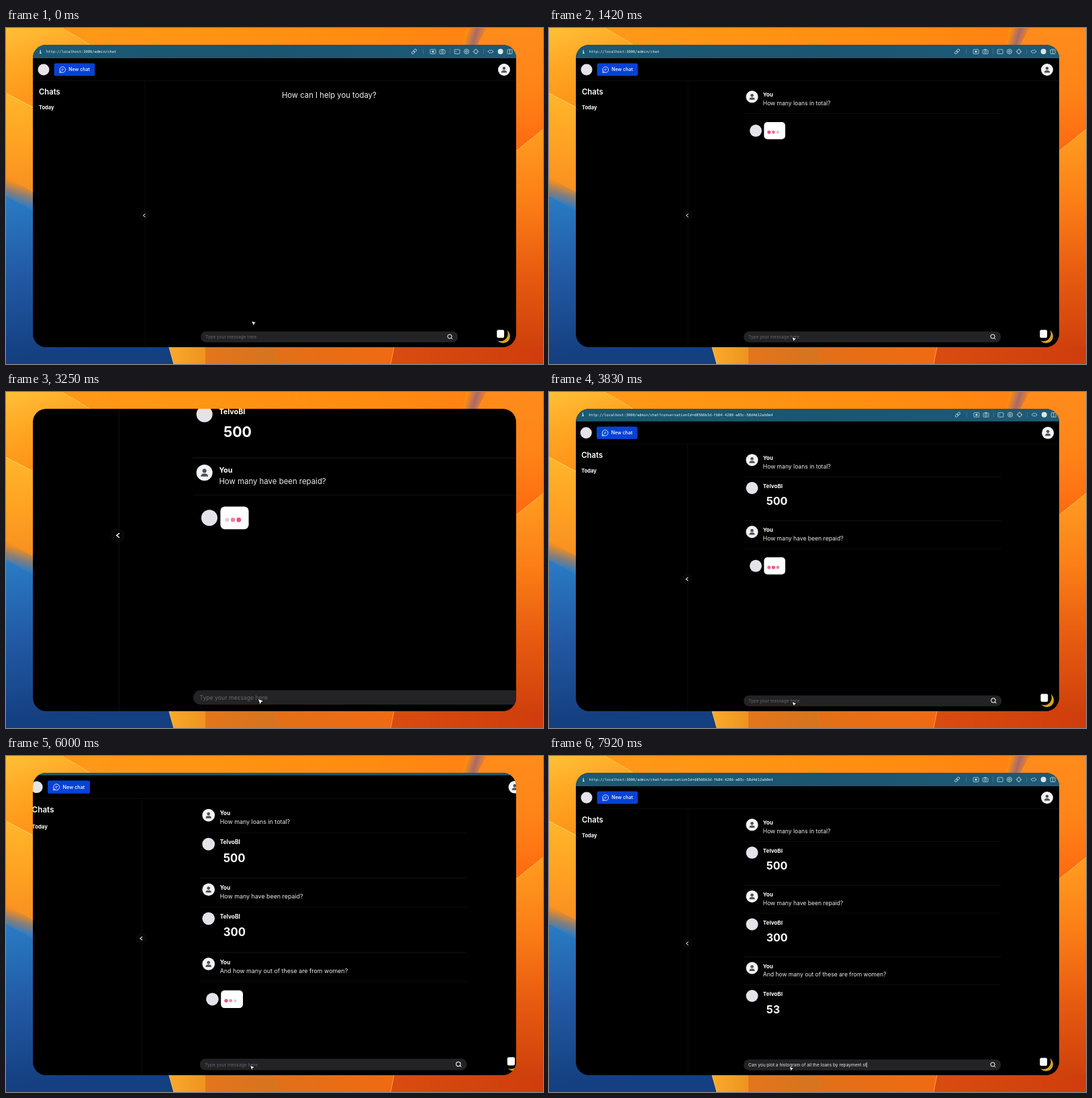
Write an HTML page with a canvas that moves like this. It is 800 by 500 pixels and loops after 8 s.

```html
<!DOCTYPE html>
<html lang="en">
<head>
<meta charset="utf-8">
<title>Chat demo</title>
<style>
  html, body { margin: 0; width: 100%; height: 100%; overflow: hidden; background: #000; }
  canvas { display: block; width: 800px; height: 500px; }
</style>
</head>
<body>
<canvas id="stage"></canvas>
<script>
const LOOP = 8000;
const BOT = 'TelvoBI';
const ROW = 106.6;
const ADDRESS = 'http://localhost:3000/admin/chat';
const CONVERSATION = '?conversationId=d8566b3d-fb84-4280-a85c-58d4d12ab0e4';
const ROUNDS = [
  { question: 'How many loans in total?', type: 450, send: 1080, reply: 1830, answer: '500' },
  { question: 'How many have been repaid?', type: 2420, send: 3100, reply: 4250, answer: '300' },
  { question: 'And how many out of these are from women?', type: 4920, send: 5560, reply: 6580, answer: '53' },
  { question: 'Can you plot a histogram of all the loans by repayment st', type: 6820, send: 7960, reply: 9000 }
];
const ZOOMS = [[2175, 3030], [4561, 5500]];
const FOCUS = { x: 323, y: 475 };
const ZOOM_GAIN = 0.95;

const canvas = document.getElementById('stage');
const ratio = window.devicePixelRatio || 1;
canvas.width = 800 * ratio;
canvas.height = 500 * ratio;
const ctx = canvas.getContext('2d');

const clamp = v => Math.max(0, Math.min(1, v));
const smooth = v => { v = clamp(v); return v * v * (3 - 2 * v); };
const lerp = (a, b, k) => a + (b - a) * k;

// Critically damped spring from 0 to 1
function spring(ms) {
  const x = Math.max(0, ms) / 100;
  return 1 - (1 + x) * Math.exp(-x);
}

function gradient(x0, y0, x1, y1, ...colors) {
  const g = ctx.createLinearGradient(x0, y0, x1, y1);
  colors.forEach((c, i) => g.addColorStop(i / (colors.length - 1), c));
  return g;
}

function poly(points, fill) {
  ctx.beginPath();
  points.forEach(([x, y]) => ctx.lineTo(x, y));
  ctx.closePath();
  ctx.fillStyle = fill;
  ctx.fill();
}

function line(points, color, width) {
  ctx.beginPath();
  points.forEach(([x, y], i) => i ? ctx.lineTo(x, y) : ctx.moveTo(x, y));
  ctx.strokeStyle = color;
  ctx.lineWidth = width;
  ctx.stroke();
}

function disc(x, y, r, fill) {
  ctx.beginPath();
  ctx.arc(x, y, r, 0, 7);
  ctx.fillStyle = fill;
  ctx.fill();
}

function ring(x, y, r, color, width) {
  ctx.beginPath();
  ctx.arc(x, y, r, 0, 7);
  ctx.strokeStyle = color;
  ctx.lineWidth = width;
  ctx.stroke();
}

function box(x, y, w, h, r, fill) {
  ctx.beginPath();
  ctx.roundRect(x, y, w, h, r);
  ctx.fillStyle = fill;
  ctx.fill();
}

function frameBox(x, y, w, h, r, color, width) {
  ctx.beginPath();
  ctx.roundRect(x, y, w, h, r);
  ctx.strokeStyle = color;
  ctx.lineWidth = width;
  ctx.stroke();
}

function text(str, x, y, size, weight = 400, color = '#fff', family = 'Inter, sans-serif') {
  ctx.font = `${weight} ${size}px ${family}`;
  ctx.fillStyle = color;
  ctx.fillText(str, x, y);
}

function drawWallpaper() {
  poly([[0, 0], [800, 0], [800, 500], [0, 500]], gradient(0, 0, 800, 0, '#ff9a1c', '#ff9512', '#ff8c10', '#ff7c14'));
  // Left side: golden folds fading to blue
  poly([[0, 0], [83, 0], [125, 25], [40, 118], [0, 97]], gradient(0, 0, 40, 110, '#ffc038', '#ffa724', '#ff9418'));
  poly([[0, 97], [40, 118], [40, 262], [0, 240]], gradient(0, 100, 0, 245, '#ffb52c', '#ffa222', '#f78f20'));
  poly([[0, 222], [40, 244], [60, 500], [0, 500]],
    gradient(3, 226, -6, 256, '#f78f20', '#8a7f78', '#2a7cc6'));
  poly([[0, 250], [40, 272], [243, 475], [250, 500], [0, 500]],
    gradient(0, 250, 30, 490, '#2a7cc6', '#2259a4', '#143f80'));
  line([[0, 97], [40, 118]], '#ffd06a', 1);
  line([[83, 0], [104, 12], [125, 25]], '#ffc355', 1);
  // Bottom edge
  poly([[243, 475], [297, 475], [297, 500], [250, 500]], gradient(245, 0, 297, 0, '#f9a92a', '#ee9420'));
  poly([[297, 475], [400, 475], [405, 500], [297, 500]], gradient(297, 0, 402, 0, '#e4761a', '#d5741f'));
  poly([[400, 475], [578, 475], [573, 500], [405, 500]], gradient(400, 0, 575, 0, '#e17018', '#f06a12'));
  poly([[578, 475], [760, 440], [800, 400], [800, 500], [573, 500]], gradient(575, 0, 800, 0, '#d94c10', '#cf3d0c'));
  line([[243, 475], [250, 500]], '#ffc257', 1);
  line([[578, 475], [573, 500]], '#ff9a3c', 1);
  // Right side
  poly([[710, 0], [800, 0], [800, 151], [760, 183], [690, 25]], gradient(0, 0, 0, 180, '#ff8c1c', '#ff8418', '#ff6a10'));
  poly([[800, 151], [760, 183], [760, 475], [800, 475]], gradient(0, 155, 0, 475, '#ff9c20', '#fb7d16', '#e75a10', '#cf410c'));
  line([[800, 151], [760, 183]], '#ffb454', 1);
  poly([[686, 0], [716, 0], [702, 25], [680, 25]], gradient(686, 8, 712, 16, '#ff8c10', '#a66a6c', '#ff861a'));
}

function person(x, y) {
  disc(x, y, 9, '#f4f4f6');
  disc(x, y - 2, 2.3, '#4d525c');
  ctx.beginPath();
  ctx.ellipse(x, y + 3.6, 4, 2.7, 0, Math.PI, 0);
  ctx.lineTo(x + 4, y + 4.4);
  ctx.lineTo(x - 4, y + 4.4);
  ctx.fillStyle = '#4d525c';
  ctx.fill();
}

const botAvatar = (x, y, r = 9) => disc(x, y, r, '#e6e2ea');

function drawToolbar(t) {
  const ink = '#c3d5dc';
  box(40, 25, 720, 20, 0, gradient(40, 0, 760, 0, '#1b5a72', '#1a5670', '#1d5b76'));
  const mono = '"DejaVu Sans Mono", monospace';
  text('i', 49.2, 37.6, 6.5, 700, '#fff', mono);
  text(ADDRESS + (t >= ROUNDS[0].reply ? CONVERSATION : ''), 60, 37.2, 5.42, 400, '#eef4f6', mono);
  for (const x of [621.5, 661.5, 711.5]) line([[x, 31], [x, 39]], '#4b7c90', 0.7);

  ctx.save();
  ctx.translate(608, 35);
  ctx.rotate(-Math.PI / 4);
  frameBox(-4.4, -1.6, 5, 3.2, 1.6, ink, 0.9);
  frameBox(-0.6, -1.6, 5, 3.2, 1.6, ink, 0.9);
  ctx.restore();

  frameBox(632, 32, 8, 6.4, 1, ink, 0.8);
  disc(636, 35.2, 1.6, ink);
  frameBox(646, 32.6, 8, 5.8, 1, ink, 0.8);
  ring(650, 35.5, 1.6, ink, 0.8);
  line([[648.5, 32], [651.5, 32]], ink, 1);
  frameBox(668, 32, 8, 6.4, 1, ink, 0.8);
  line([[669.6, 34], [671, 35], [669.6, 36]], ink, 0.6);
  ring(686, 35, 3.5, ink, 0.9);
  ring(686, 35, 1.4, ink, 0.9);
  ring(700, 35, 2.9, ink, 0.8);
  for (const [dx, dy] of [[1, 0], [-1, 0], [0, 1], [0, -1]])
    line([[700 + dx * 2, 35 + dy * 2], [700 + dx * 4.3, 35 + dy * 4.3]], ink, 0.8);
  line([[721, 32.5], [717.8, 35], [721, 37.5], [722, 36.3], [723, 37.5], [726.2, 35], [723, 32.5], [722, 33.7], [721, 32.5]], ink, 0.8);
  disc(736.6, 35, 4, '#dbe5e9');
  frameBox(747, 32, 7, 6.4, 0.8, ink, 0.8);
  line([[750.5, 32], [750.5, 38.4]], ink, 0.8);
}

function drawChrome() {
  line([[40, 78.5], [760, 78.5]], '#111113', 0.8);
  line([[207, 78.5], [207, 475]], '#111113', 0.8);
  botAvatar(56, 62, 8.5);
  box(71.7, 52.6, 60.6, 18.6, 2.5, '#0742d6');
  ring(84.3, 62, 4.3, '#fff', 0.8);
  line([[80.3, 63.5], [79.9, 66.4], [82.8, 66]], '#fff', 0.8);
  line([[82.5, 61.2], [86.2, 61.2]], '#fff', 0.7);
  line([[82.5, 63], [85, 63]], '#fff', 0.7);
  text('New chat', 93.3, 64.4, 7, 500);
  person(742, 62);
  text('Chats', 49, 98.8, 11.3, 600);
  text('Today', 49, 121.2, 7.5, 700);
  disc(206, 279, 7.2, '#070708');
  ring(206, 279, 7.2, '#111113', 0.6);
  line([[207.6, 276.5], [204.4, 279], [207.6, 281.5]], '#fff', 1);
}

function drawLoader(t, y) {
  botAvatar(308, y);
  box(320.3, y - 12.7, 31.6, 25.4, 5, '#fff');
  for (let i = 0; i < 3; i++) {
    const k = 0.5 + 0.5 * Math.cos(2 * Math.PI * ((t - 1420) / 770 - i * 0.17));
    const color = `rgb(${lerp(222, 236, k)}, ${lerp(220, 84, k)}, ${lerp(226, 124, k)})`;
    disc(327.8 + i * 6.5, y + 2.2, lerp(2.1, 2.6, k), color);
  }
}

function drawMessages(t) {
  if (t < ROUNDS[0].send) {
    ctx.textAlign = 'center';
    text('How can I help you today?', 481.3, 104.3, 11.3, 400, '#f0f0f0');
    ctx.textAlign = 'left';
  }
  ROUNDS.forEach((round, i) => {
    if (t < round.send) return;
    const y = i * ROW;
    const rule = dy => line([[290, y + dy], [673, y + dy]], '#121214', 0.8);
    if (i) rule(85.8);
    person(302.5, y + 102.3);
    text('You', 318.8, y + 102.4, 8.1, 700);
    text(round.question, 318.8, y + 114.9, 8.56, 400, '#ececec');
    rule(127.3);
    if (t < round.reply) return drawLoader(t, y + 152.8);
    botAvatar(302.5, y + 143.8);
    text(BOT, 318.8, y + 143.9, 8.1, 700);
    text(round.answer, 323.7, y + 169.3, 16, 700);
    if (i < 2) rule(192.4);
  });
}

function drawInput(t) {
  box(290, 451.5, 383.3, 16.2, 8.1, '#232225');
  const round = ROUNDS.find(r => t < r.send);
  const share = clamp((t - round.type) / (round.send - 70 - round.type));
  const typed = round.question.slice(0, Math.round(share * round.question.length));
  if (typed) text(typed, 297, 462, 6.56, 400, '#e6e6e6');
  else text('Type your message here', 297, 462, 6.52, 400, '#68676b');
  const waiting = ROUNDS.some(r => t >= r.send && t < r.reply);
  if (t > 350 && !waiting) {
    const x = 297 + (typed ? ctx.measureText(typed).width + 0.4 : 0);
    line([[x, 455.8], [x, 463.4]], '#fff', 0.7);
  }
  ring(661, 459, 3.1, '#fff', 1);
  line([[663.2, 461.2], [665.2, 463.2]], '#fff', 1);
}

function drawLaunchers() {
  disc(740.5, 458.5, 10.5, '#d8a51e');
  disc(736.6, 455, 11, '#000');
  box(731.3, 449.3, 10.8, 11.8, 2, '#fff');
}

function drawPointer(t) {
  const down = smooth((t - 100) / 250);
  const left = smooth((t - 6600) / 250);
  const x = lerp(366.5, 362.6, down) - 4 * left;
  const y = lerp(436.6, 460.5, down) + smooth((t - 1500) / 400) + 1.3 * left;
  ctx.save();
  ctx.translate(x, y);
  ctx.lineJoin = 'round';
  const arrow = [[0, 0], [5.6, 2.2], [3.1, 3.2], [2.1, 5.8], [0, 0]];
  line(arrow, '#000', 1.2);
  poly(arrow, '#fff');
  ctx.restore();
}

function draw(t) {
  ctx.setTransform(ratio, 0, 0, ratio, 0, 0);
  drawWallpaper();
  ctx.save();
  ctx.beginPath();
  ctx.roundRect(40, 25, 720, 450, 20);
  ctx.fillStyle = '#000';
  ctx.fill();
  ctx.clip();
  const scale = ZOOMS.reduce((s, [from, to]) => s + ZOOM_GAIN * (spring(t - from) - spring(t - to)), 1);
  ctx.translate(FOCUS.x, FOCUS.y);
  ctx.scale(scale, scale);
  ctx.translate(-FOCUS.x, -FOCUS.y);
  drawToolbar(t);
  drawChrome();
  drawMessages(t);
  drawInput(t);
  drawLaunchers();
  drawPointer(t);
  ctx.restore();
}

function tick() {
  draw(Math.min(performance.now() % LOOP, 7950));
  requestAnimationFrame(tick);
}
tick();
</script>
</body>
</html>
```
